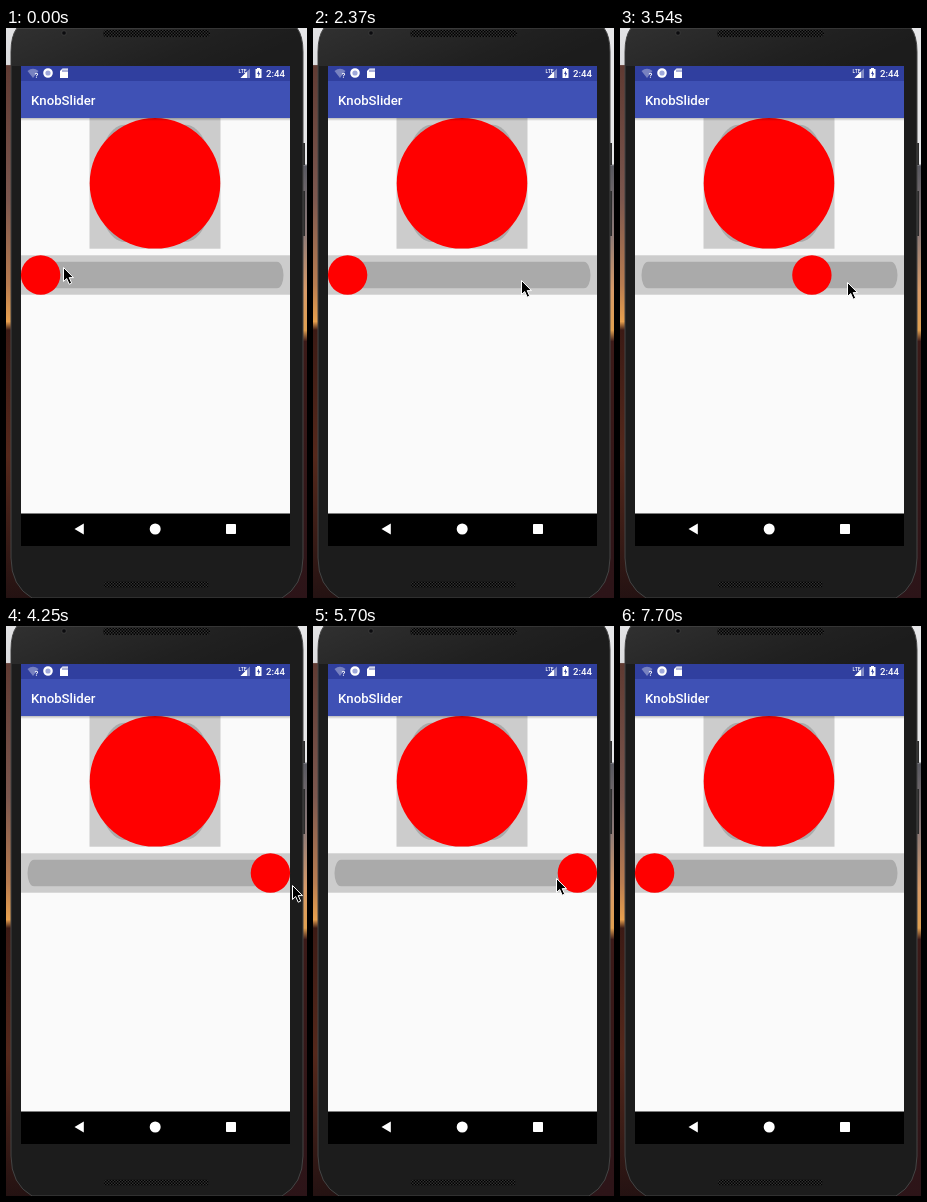
Recreate the animation shown at these times as an HTML page. Size 301 px wide and 570 px high, loop 9110 ms.

```html
<!DOCTYPE html>
<html lang="en">
<head>
<meta charset="utf-8">
<title>Slider demo</title>
<style>
  html, body { margin: 0; width: 100%; height: 100%; overflow: hidden; background: #1c1c1c; }
  svg { display: block; width: 301px; height: 570px; }
  text { font-family: Roboto, sans-serif; font-weight: 500; fill: #fff; }
</style>
</head>
<body>
<svg viewBox="0 0 301 570">
  <defs>
    <linearGradient id="sky" x2="0" y2="1">
      <stop offset="0" stop-color="#e2e2e4"/>
      <stop offset=".064" stop-color="#dcdcde"/>
      <stop offset=".066" stop-color="#5f3a32"/>
      <stop offset=".3" stop-color="#7c574e"/>
      <stop offset=".45" stop-color="#b87c50"/>
      <stop offset=".515" stop-color="#e8a04e"/>
      <stop offset=".53" stop-color="#3c1a14"/>
      <stop offset=".75" stop-color="#55281b"/>
      <stop offset="1" stop-color="#241212"/>
    </linearGradient>
    <linearGradient id="dusk" x2="0" y2="1">
      <stop offset="0" stop-color="#e6e6e8"/>
      <stop offset=".238" stop-color="#e6e6e8"/>
      <stop offset=".242" stop-color="#585860"/>
      <stop offset=".36" stop-color="#8c7a78"/>
      <stop offset=".46" stop-color="#d79a68"/>
      <stop offset=".53" stop-color="#e0a050"/>
      <stop offset=".55" stop-color="#3c1a18"/>
      <stop offset="1" stop-color="#2c1418"/>
    </linearGradient>
    <linearGradient id="glare" x2="1" y2=".3">
      <stop offset="0" stop-color="#fff" stop-opacity=".09"/>
      <stop offset=".7" stop-color="#fff" stop-opacity=".02"/>
      <stop offset="1" stop-color="#fff" stop-opacity="0"/>
    </linearGradient>
    <linearGradient id="shade" x2="0" y2="1">
      <stop offset="0" stop-color="#000" stop-opacity=".25"/>
      <stop offset="1" stop-color="#000" stop-opacity="0"/>
    </linearGradient>
    <pattern id="mesh" width="3" height="3" patternUnits="userSpaceOnUse">
      <rect width="3" height="3" fill="#303030"/>
      <path d="M0 0h1.5v1.5H0zM1.5 1.5H3V3H1.5z" fill="#000"/>
    </pattern>
  </defs>

  <!-- backdrop and phone -->
  <rect width="150" height="570" fill="url(#sky)"/>
  <rect x="150" width="151" height="570" fill="url(#dusk)"/>
  <rect x="296" y="115" width="3" height="22" fill="#2a2a2a"/>
  <rect x="296" y="163" width="3" height="45" fill="#2a2a2a"/>
  <path d="M11 0Q5 8 5 24V530Q5 558 26 570H276Q297 558 297 530V24Q297 8 291 0Z" fill="#1c1c1c" stroke="#444"/>
  <path d="M11 0Q6 8 6 24V38H296V24Q296 8 291 0Z" fill="url(#glare)"/>
  <circle cx="58" cy="5" r="3" fill="#333"/>
  <circle cx="58" cy="5" r="1.8" fill="#0b0b0e"/>
  <rect x="97" y="2" width="107" height="7" rx="3.5" fill="url(#mesh)"/>
  <rect x="98" y="553" width="105" height="7" rx="3.5" fill="url(#mesh)"/>

  <!-- screen -->
  <rect x="15" y="38" width="269" height="448" fill="#fafafa"/>
  <rect x="15" y="38" width="269" height="15" fill="#303f9f"/>
  <rect x="15" y="53" width="269" height="37" fill="#3f51b5"/>
  <text x="25" y="76.5" font-size="13.2">KnobSlider</text>

  <!-- status icons -->
  <path d="M21.5 43Q27 38.5 32.5 43L27 50Z" fill="#fff" opacity=".35"/>
  <text x="28.5" y="50" font-size="8">?</text>
  <circle cx="42" cy="45" r="3.7" fill="#9fa8da" stroke="#fff" stroke-width="2.2"/>
  <path d="M56.5 40.5H62V50H54V43Z" fill="#fff"/>
  <path d="M57 41.5V44M59 41.5V44M61 41.5V44" stroke="#303f9f" stroke-width=".8"/>
  <text x="232.5" y="44.5" font-size="5">LTE</text>
  <path d="M244 40.5V50H234.5Z" fill="#fff" opacity=".4"/>
  <path d="M241 43.5V50H234.5Z" fill="#fff"/>
  <path d="M251 40H254V41H255.5V50H249.5V41H251Z" fill="#fff"/>
  <path d="M253 42.5L251 46H252.3V49L254.2 45.3H253Z" fill="#303f9f"/>
  <text x="260" y="49" font-size="9.6">2:44</text>

  <!-- navigation bar -->
  <rect x="15" y="485.5" width="269" height="32.5" fill="#000"/>
  <path d="M68.5 501L77.8 495.5V506.5Z" fill="#fff"/>
  <circle cx="149.2" cy="501" r="5.5" fill="#fff"/>
  <rect x="220" y="496" width="10" height="10" rx=".7" fill="#fff"/>

  <!-- square switch -->
  <rect x="83.5" y="90" width="131" height="130.7" fill="#ccc"/>
  <rect x="90.5" y="96.7" width="117" height="117.3" rx="28" ry="58.6" fill="#aaa"/>
  <circle cx="149" cy="155.3" r="65.3" fill="#f00"/>
  <rect x="15" y="90" width="269" height="3" fill="url(#shade)"/>

  <!-- wide switch -->
  <rect x="15" y="227.3" width="269" height="39.4" fill="#ccc"/>
  <rect x="21.5" y="233.8" width="256" height="26.5" rx="6.5" ry="13.2" fill="#aaa"/>
  <circle id="knob" cy="247" r="19.7" fill="#f00"/>

  <path id="cursor" d="M-.5 .5V14.5L2.7 11.5L5.2 17.2L7.7 16.1L5.2 10.6H9.5Z"
        fill="#000" stroke="#fff" stroke-width="1"/>
</svg>
<script>
const LOOP = 9110;
const GONE = 7690;
const LAG = 130;      // the knob trails the pointer
const SETTLE = 450;   // time to slide home after release
const OFF = 34.6, ON = 264.4;
const START = { x: 58, y: 239 };

const moves = [
  { from: 330, to: 650, x: 30, y: 245 },
  { from: 1310, to: 2190, x: 209, y: 252 },
  { from: 2370, to: 2710, x: 16, y: 241 },
  { from: 2950, to: 3740, x: 268, y: 256 },
  { from: 4070, to: 4200, x: 290, y: 261 },
  { from: 4200, to: 4480, x: 257, y: 243 },
  { from: 4600, to: 4850, x: 182, y: 246 },
  { from: 5400, to: 5860, x: 268, y: 254 },
  { from: 6160, to: 6505, x: 80, y: 252 },
  { from: 7520, to: GONE, x: 226, y: 552 }
];

const drags = [
  { press: 2950, release: 4000, home: ON },
  { press: 4600, release: 5210, home: ON },
  { press: 6160, release: 6850, home: OFF }
];

const knob = document.getElementById("knob");
const cursor = document.getElementById("cursor");

const clamp = (v, low, high) => Math.min(high, Math.max(low, v));
const mix = (a, b, k) => a + (b - a) * k;

function ease(t, from, to) {
  const k = clamp((t - from) / (to - from), 0, 1);
  return k * k * (3 - 2 * k);
}

function pointerAt(t) {
  return moves.reduce((p, m) => {
    const k = ease(t, m.from, m.to);
    return { x: mix(p.x, m.x, k), y: mix(p.y, m.y, k) };
  }, START);
}

function knobAt(t) {
  return drags.reduce((rest, { press, release, home }) => {
    if (t < press) return rest;
    const heldAt = Math.max(press, Math.min(t, release) - LAG);
    const shift = pointerAt(heldAt).x - pointerAt(press).x;
    const held = clamp(rest + shift, OFF, ON);
    return mix(held, home, ease(t, release, release + SETTLE));
  }, OFF);
}

function draw() {
  const t = performance.now() % LOOP;
  const { x, y } = pointerAt(t);
  knob.setAttribute("cx", knobAt(t));
  cursor.setAttribute("transform", `translate(${Math.round(x)} ${Math.round(y)})`);
  cursor.setAttribute("visibility", t < GONE ? "visible" : "hidden");
  requestAnimationFrame(draw);
}
draw();
</script>
</body>
</html>
```
